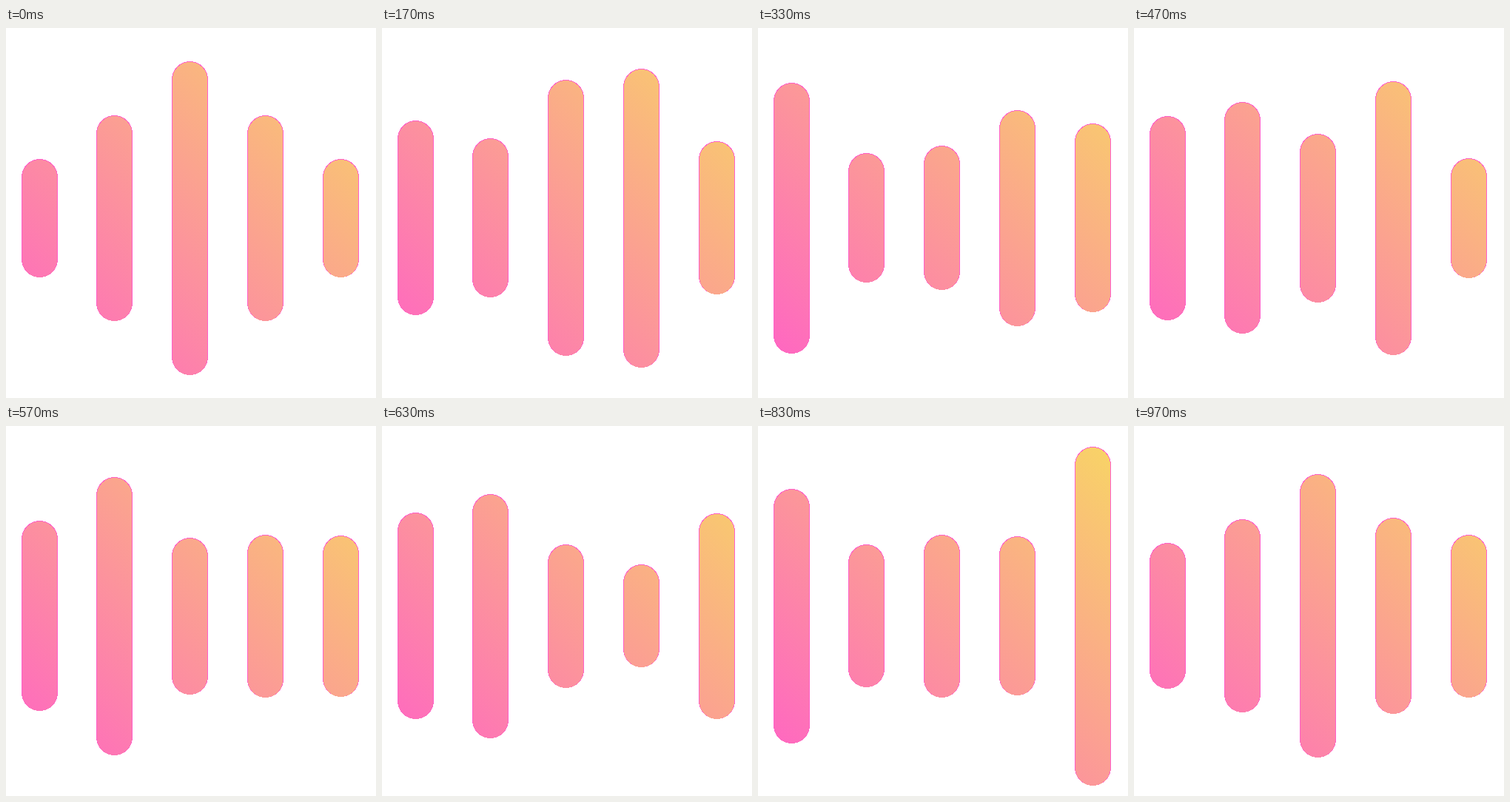
Write an HTML page that moves like this. It is 500x500 px and loops after 1010 ms.

```html
<!DOCTYPE html>
<html lang="en">
<head>
<meta charset="utf-8">
<title>Sound bars</title>
<style>
  html, body { margin: 0; width: 100%; height: 100%; overflow: hidden; background: #fff; }
  svg { display: block; width: 100%; height: 100%; }
  rect { shape-rendering: crispEdges; }
</style>
</head>
<body>
<svg id="stage" viewBox="0 0 500 500">
  <defs>
    <linearGradient id="blend" gradientUnits="userSpaceOnUse" x1="20.5" y1="485" x2="477.5" y2="28">
      <stop offset="0" stop-color="#ff61c6"/>
      <stop offset="1" stop-color="#f8d466"/>
    </linearGradient>
  </defs>
</svg>
<script>
  const LOOP = 1010, STEPS = 30, STEP = 100 / 3;
  const LEFT = 21, GAP = 101.75, WIDTH = 49, MIDDLE = 256.7;

  // Where each bar turns between rest and rest: [step, half height]
  const turns = [
    [[10.3, 186], [15.4, 120], [25, 172]],
    [[9.5, 79], [16.3, 196], [25, 96.5]],
    [[3, 222], [10, 97.5], [14.6, 116.5], [19, 97], [25, 110]],
    [[6, 214.5], [10, 146], [14.3, 188], [18.5, 66.5]],
    [[10.4, 129.5], [14.6, 73], [25, 229]]
  ];

  const stage = document.getElementById("stage");

  function addRect(fill, x, width) {
    const rect = document.createElementNS("http://www.w3.org/2000/svg", "rect");
    const attrs = { fill, x, width, rx: width / 2 };
    for (const name in attrs) rect.setAttribute(name, attrs[name]);
    return stage.appendChild(rect);
  }

  // Rest pose: tallest in the middle, shorter towards both sides
  function restHeight(i) {
    const d = Math.abs(i - 2);
    return 212 - 80 * d + 7 * d * d;
  }

  const bars = turns.map((keys, i) => {
    const x = Math.floor(LEFT + i * GAP), rest = restHeight(i);
    return {
      track: [[0, rest], ...keys, [STEPS, rest]],
      rim: addRect("#ff60ca", x, WIDTH),
      face: addRect("url(#blend)", x + 1, WIDTH - 2)
    };
  });

  function valueAt(track, step) {
    const next = track.findIndex(key => key[0] > step);
    const [t0, v0] = track[next - 1], [t1, v1] = track[next];
    return v0 + (v1 - v0) * (step - t0) / (t1 - t0);
  }

  function place(rect, top, bottom) {
    rect.setAttribute("y", top);
    rect.setAttribute("height", bottom - top);
  }

  // Steps start on whole hundredths of a second
  function stepAt(ms) {
    const tick = Math.floor(ms / 10) * 10;
    return Math.min(STEPS - 1, Math.floor((tick + 5) / STEP));
  }

  function draw(ms) {
    const step = stepAt(ms % LOOP);
    for (const { track, rim, face } of bars) {
      const half = valueAt(track, step);
      const top = Math.round(MIDDLE - half), bottom = Math.round(MIDDLE + half);
      place(rim, top, bottom);
      place(face, top + 1, bottom);
    }
  }

  let start;
  function tick(now) {
    if (start === undefined) start = now;
    draw(Math.max(0, now - start));
    requestAnimationFrame(tick);
  }
  draw(0);
  requestAnimationFrame(tick);
</script>
</body>
</html>
```
